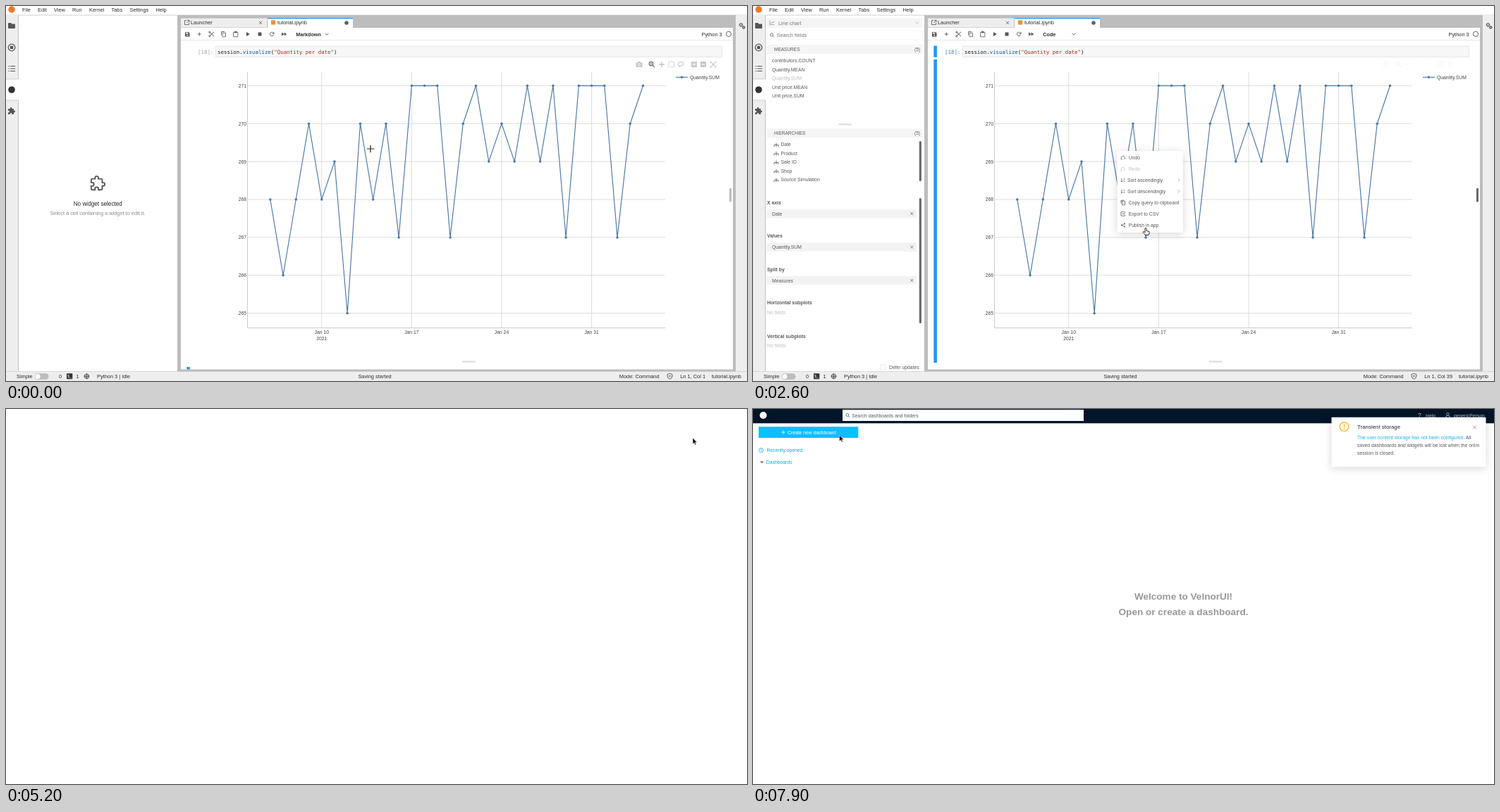
An HTML page for the animation above (8000 ms loop, 1051 by 533 pixels).

```html
<!DOCTYPE html>
<html lang="en">
<head>
<meta charset="utf-8">
<title>Publish a widget</title>
<style>
html, body { margin: 0; width: 100%; height: 100%; overflow: hidden; background: #fff; }
svg { display: block; width: 1051px; height: 533px; }
text { font: 6.8px "Liberation Sans", Arial, sans-serif; fill: #595959; white-space: pre; }
.ui { font-size: 7.4px; fill: #2b2b2b; }
.b { font-weight: bold; }
.cap { font-size: 6.5px; }
.title { font-size: 7.9px; fill: #262626; }
.code { font: 7.41px "DejaVu Sans Mono", monospace; fill: #212121; }
.url { font: 8.2px "Noto Sans", sans-serif; fill: #333; }
.hero { font: bold 13.57px "Liberation Sans", Arial, sans-serif; fill: #999; }
.mid { text-anchor: middle; }
.end { text-anchor: end; }
.off { fill: #bfbfbf; }
.link { fill: #1fb0ea; }
.card { filter: drop-shadow(0 2px 6px rgba(0,0,0,.16)); }
</style>
</head>
<body>
<svg id="stage" viewBox="0 0 1051 533" xmlns="http://www.w3.org/2000/svg"></svg>
<script>
const DARK = '#555', SKY = '#00aeef', LINE = '#4c78a8';

// ---- drawing helpers, all returning markup ----
const text = (x, y, s, cls = '', extra = '') =>
  `<text x="${x}" y="${y}" class="${cls}" ${extra}>${s}</text>`;
const rect = (x, y, w, h, fill, extra = '') =>
  `<rect x="${x}" y="${y}" width="${w}" height="${h}" fill="${fill}" ${extra}/>`;
const dot = (x, y, r, fill, extra = '') =>
  `<circle cx="${x}" cy="${y}" r="${r}" fill="${fill}" ${extra}/>`;
const ring = (x, y, r, color, w = 1) => dot(x, y, r, 'none', `stroke="${color}" stroke-width="${w}"`);
const line = (d, color = DARK, w = 1, extra = '') =>
  `<path d="${d}" fill="none" stroke="${color}" stroke-width="${w}" ${extra}/>`;
const shape = (d, fill = DARK, extra = '') => `<path d="${d}" fill="${fill}" ${extra}/>`;
const group = (id, body, extra = '') => `<g id="${id}" ${extra}>${body}</g>`;
const at = (x, y, body, scale = 1) => `<g transform="translate(${x} ${y}) scale(${scale})">${body}</g>`;
const cross = (x, y, r, color = DARK, w = .8) =>
  line(`M${x - r} ${y - r}l${2 * r} ${2 * r}m0 ${-2 * r}l${-2 * r} ${2 * r}`, color, w);
const plus = (x, y, r, color = DARK, w = .9) => line(`M${x - r} ${y}h${2 * r}M${x} ${y - r}v${2 * r}`, color, w);
const chevron = (x, y, color = DARK) => line(`M${x - 2.3} ${y - 1.2}l2.3 2.4 2.3-2.4`, color, .9);
const lens = (x, y, color) => ring(x - .6, y - .6, 2, color, .8) + line(`M${x + .9} ${y + .9}l2 2`, color, .8);

const PUZZLE = 'M20.5 11H19V7c0-1.1-.9-2-2-2h-4V3.5C13 2.1 11.9 1 10.5 1S8 2.1 8 3.5V5H4c-1.1 0-2 .9-2 2v3.8h1.5' +
  'c1.5 0 2.7 1.2 2.7 2.7S5 16.2 3.5 16.2H2V20c0 1.1.9 2 2 2h3.8v-1.5c0-1.5 1.2-2.7 2.7-2.7s2.7 1.2 2.7 2.7V22H17' +
  'c1.1 0 2-.9 2-2v-4h1.5c1.4 0 2.5-1.1 2.5-2.5S21.9 11 20.5 11z';
const gear = (x, y, r) => ring(x, y, r, DARK, 1.1) + dot(x, y, r + .7, 'none',
  `stroke="${DARK}" stroke-width="1" stroke-dasharray="${r * .6}"`);

// ---- notebook window ----
function chrome() {
  const menu = [['File', 23], ['Edit', 45], ['View', 68], ['Run', 94], ['Kernel', 118], ['Tabs', 149.5], ['Settings', 175.5], ['Help', 212.5]];
  const leftBar = rect(0, 13, 18, 507, '#eee') + rect(17, 13, 1, 507, '#c4c4c4') + rect(0, 104, 18, 30, '#fff') +
    rect(0, 103.5, 17, .8, '#c4c4c4') + rect(0, 133.5, 17, .8, '#c4c4c4') +
    shape('M3 25q0-1 1-1h3l1.3 1.4H12q1 0 1 1V31q0 1-1 1H4q-1 0-1-1z') +
    ring(8, 59, 4.8, DARK, 1.3) + rect(5.8, 56.8, 4.4, 4.4, DARK) +
    [85.5, 89, 92.5].map(y => line(`M3.5 ${y}h1.4m1.2 0h7`, DARK, 1.1)).join('') +
    dot(8, 119, 4.8, '#333') + at(2, 143.5, shape(PUZZLE), .48);
  const dock = rect(243, 13, 792, 507, '#bdbdbd') + rect(248, 17.5, 122, 13, '#eee') + rect(371, 17.5, 121, 14, '#fff') +
    rect(371, 17, 121, 1.2, '#2196f3') + rect(248, 31, 783, 485.5, '#fff') + rect(248, 48, 783, .7, '#ddd') +
    line('M256 20.5h-2.5v6h6V24M257 20.3h3v3m0-3l-3.5 3.6', DARK, .8) + text(262, 26, 'Launcher', 'ui') + cross(361, 23.8, 2.1) +
    rect(376, 20.3, 6.2, 6.2, '#f39034') + text(385, 26, 'tutorial.ipynb', 'ui') + dot(483, 24, 2.8, '#616161');
  const tools = shape('M254 37h5l1.5 1.5V43.500h-6.500zM255 37.800v1.600h3.300v-1.600z', DARK, 'fill-rule="evenodd"') + dot(257.2, 41.6, 1, '#fff') +
    plus(274.3, 40, 2.6) + line('M288.500 37l6.500 6.200M288.500 43l6.500-6.200', DARK, 1) + ring(288.8, 37.2, 1.1, DARK, .8) + ring(288.8, 42.8, 1.1, DARK, .8) +
    line('M305.500 41.500v-5h4.500M307 38.200h4.500v5.500H307z', DARK, .8) + line('M322.500 37.300h6.300v6.500h-6.300z', DARK, .8) + rect(324, 36, 3.4, 2.2, DARK) +
    shape('M341 37l4.800 3-4.800 3zM357.500 37.500h5v5h-5zM391 37.400l3.600 2.600-3.600 2.600zM394.600 37.400l3.600 2.600-3.600 2.600z') +
    line('M379.400 38.500a2.700 2.700 0 1 0 .3 2.300', DARK, .9) + shape('M380.400 36.800v2.900h-2.900z') +
    text(411.3, 42.5, '', 'ui b', 'id="mode" style="font-size:7.2px"') + chevron(455, 40) +
    text(986.5, 42.5, 'Python 3', 'ui') + ring(1025, 39.8, 3.6, DARK, .9);
  const status = rect(0, 519.5, 1051, 13.5, '#eee') + rect(0, 519, 1051, .6, '#c8c8c8') + text(15, 528.8, 'Simple', 'ui') +
    rect(40.5, 522.3, 20, 8.6, '#bdbdbd', 'rx="4.300"') + dot(45, 526.6, 3.6, '#fff') +
    text(75, 528.8, '0', 'ui') + rect(86, 522.3, 8.3, 8, '#333', 'rx="1"') + text(87.2, 528.3, '$_', '', 'style="font-size:5px;fill:#fff"') +
    text(99.5, 528.8, '1', 'ui') + ring(114.5, 526.2, 3, DARK, 1.1) + plus(114.5, 526.2, 4.3, DARK, .8) + dot(114.5, 526.2, 1.2, DARK) +
    text(129, 528.8, 'Python 3 | Idle', 'ui') + text(0, 528.8, 'Saving started', 'ui mid', 'id="saving"') +
    group('modeInfo', text(926.5, 528.8, 'Mode: Command', 'ui end') +
      line('M938 523.500l3.500-1.200 3.500 1.200v2.500q0 3-3.500 4.300-3.500-1.300-3.500-4.300z', DARK, .9) + cross(941.5, 526, 1.4)) +
    text(992, 528.8, '', 'ui end', 'id="position"') + text(1001, 528.8, 'tutorial.ipynb', 'ui');
  return rect(0, 0, 1051, 533, '#fff') + rect(0, 12.7, 1051, .7, '#bdbdbd') + dot(8, 5, 4.7, '#f37726') +
    menu.map(([s, x]) => text(x, 7.7, s, 'ui')).join('') + leftBar + dock + tools +
    rect(1035, 13, 16, 507, '#eee') + gear(1042.5, 26.8, 1.8) + gear(1046.3, 30.4, 1.3) + status;
}

function chart() {
  const day = n => 374.8 + 18.232 * n, level = v => 113.3 + (271 - v) * 53.9;
  const values = [...'838...'].length && [...'868089508071117019091917111701'];
  const decode = { 8: 268, 6: 266, 0: 270, 9: 269, 5: 265, 7: 267, 1: 271 };
  const series = [268, 266, 268, 270, 268, 269, 265, 270, 268, 270, 267, 271, 271, 271, 267,
    270, 271, 269, 270, 269, 271, 269, 271, 267, 271, 271, 271, 267, 270, 271];
  const points = series.map((v, i) => [day(i), level(v)]);
  const GRID = '#d3d3d3';
  let out = '';
  for (let v = 265; v <= 271; v++)
    out += line(`M342.500 ${level(v)}H935`, GRID, .8) + text(341, level(v) + 2.4, v, 'end', 'style="fill:#444"');
  ['Jan 10', 'Jan 17', 'Jan 24', 'Jan 31'].forEach((s, i) => {
    const x = day(4 + 7 * i);
    out += line(`M${x} 93.500V457.500`, GRID, .8) + text(x, 466, s, 'mid', 'style="fill:#444"');
  });
  return out + text(day(4), 474.6, '2021', 'mid', 'style="fill:#444"') + line('M342.500 93.500V457.500H935', '#c4c4c4', .9) +
    line('M' + points.map(p => p.join(' ')).join('L'), LINE, 1.15) + points.map(([x, y]) => dot(x, y, 1.75, LINE)).join('') +
    line('M950 101.300h17', LINE, 1.15) + dot(958.5, 101.3, 1.75, LINE) + text(970, 103.8, 'Quantity.SUM', '', 'style="fill:#444"');
}

function plotTools() {
  const c = '#c6c6c6';
  return shape('M893.500 80.500h2l1-1.500h3l1 1.500h2v6.300h-9z', c) + ring(898, 83.4, 1.6, '#fff', .9) +
    ring(915, 82, 2.7, '#7c7c7c', 1.5) + line('M917 84l3 3', '#7c7c7c', 1.5) + plus(915, 82, 1.3, '#7c7c7c', .8) +
    plus(930, 83, 4, c, 1.3) + dot(930, 83, 1.5, c) + line('M940 79.200h7.800v7.600H940z', c, 1.1, 'stroke-dasharray="1.800 1"') +
    line('M955 85.500c-3-2-1.500-6 2.500-6s5 4 1.500 5.300-4-.5-4.500 2.200', c, 1.1) +
    [976, 989].map(x => rect(x - 4, 79, 8, 8, c)).join('') + plus(976, 83, 2.3, '#fff', 1.2) + line('M986.700 83h4.600', '#fff', 1.2) +
    cross(1003, 83, 2.6, c, 1.2) + line('M999 81v-2h2m4 0h2v2m0 4v2h-2m-4 0h-2v-2', c, 1);
}

function notebook() {
  const code = text(300, 67.5, 'session.<tspan fill="#0055aa">visualize</tspan>(<tspan fill="#ba2121">"Quantity per date"</tspan>)', 'code');
  return rect(297.5, 57, 718, 15.6, '#f7f7f7', 'stroke="#e0e0e0" stroke-width=".700"') + text(272, 67.5, '[18]:', 'code', 'id="prompt"') + code +
    chart() + group('plotTools', plotTools()) + rect(647, 504.3, 18.5, 2.4, '#e0e0e0') +
    rect(1026, 259, 3, 19.5, '#bbb', 'id="thumb" rx="1"');
}

const emptyPanel = () => at(119, 241, line(PUZZLE, DARK, 2), .92) +
  text(130.3, 284, 'No widget selected', 'mid', 'style="font-size:8.2px;fill:#262626"') +
  text(130, 297, 'Select a cell containing a widget to edit it.', 'mid', 'style="font-size:7.4px;fill:#8a8a8a"');

function editorPanel() {
  const band = (y, s) => rect(20, y, 220, 13, '#f5f5f5') + text(30, y + 9, s, 'cap') + text(237, y + 8.8, '(5)', 'cap end');
  const measures = ['contributors.COUNT', 'Quantity.MEAN', 'Quantity.SUM', 'Unit price.MEAN', 'Unit price.SUM'];
  const trees = ['Date', 'Product', 'Sale ID', 'Shop', 'Source Simulation'];
  const fields = [['X axis', 'Date'], ['Values', 'Quantity.SUM'], ['Split by', 'Measures'], ['Horizontal subplots'], ['Vertical subplots']];
  return rect(20, 17, 220, 14, '#f5f5f5') + line('M24 20.500v6h6M25.500 25l1.500-2 1.200 1 1.800-2.500', '#888', .7) +
    text(36, 26.6, 'Line chart', '', 'style="font-size:7.4px;fill:#777"') + chevron(233, 24, '#bbb') +
    rect(20, 35, 220, 13, '#fff', 'stroke="#efefef" stroke-width=".600"') + lens(27, 41.5, DARK) +
    text(33.5, 44.2, 'Search fields', '', 'style="font-size:7.4px;fill:#777"') +
    band(55, 'MEASURES') + measures.map((s, i) => text(27, 80 + 12.5 * i, s, i === 2 ? 'off' : '')).join('') +
    rect(121, 167, 18.5, 2.4, '#e0e0e0') + band(174.3, 'HIERARCHIES') +
    trees.map((s, i) => line(`M30 ${200 + 12.5 * i}v-2.500h6v2.500m-3 0v-5.500`, DARK, .8) + text(39.5, 199.4 + 12.5 * i, s)).join('') +
    rect(235.7, 192, 3.2, 57, '#6a6a6a', 'rx="1.500"') + rect(235.7, 273, 3.2, 178, '#6a6a6a', 'rx="1.500"') +
    fields.map(([label, value], i) => {
      const y = 47.4 * i;
      return text(20, 282 + y, label, 'b', 'style="font-size:6.85px"') + (value
        ? rect(20, 289 + y, 212, 12.3, '#f3f3f3', 'rx="1"') + text(27, 297.7 + y, value) + cross(225.3, 295.2 + y, 2, DARK, .7)
        : text(20, 295.3 + y - (i === 4 ? .3 : 0), 'No fields', 'off'));
    }).join('') +
    rect(181, 510, 7, 7, '#fff', 'stroke="#e0e0e0" stroke-width=".700"') + text(193, 516, 'Defer updates') +
    rect(256.3, 56.5, 4.6, 16.3, '#2196f3') + rect(256.3, 76, 4.6, 431, '#2196f3');
}

function contextMenu() {
  const undo = y => line(`M523 ${y + 2.5}a2.700 2.700 0 1 1 3.600 0M522 ${y + 2.6}h1.600`, 'currentColor', .8);
  const sort = y => line(`M523 ${y - 2.5}v5m-1-1.200l1 1.200 1-1.200M526.300 ${y - 2.5}v2m0 1v2`, 'currentColor', .8);
  const items = [
    ['Undo', undo], ['Redo', undo], ['Sort ascendingly', sort], ['Sort descendingly', sort],
    ['Copy query to clipboard', y => line(`M523.500 ${y - 2.2}h4v5.500h-4zM522 ${y + 1}v-4.300h4`, 'currentColor', .8)],
    ['Export to CSV', y => line(`M527.500 ${y - 1.5}v-1.300h-5.500v5.600h5.500v-1.300M524 ${y}h4`, 'currentColor', .8)],
    ['Publish in app', y => dot(522.8, y, 1, 'currentColor') + dot(527, y - 2, 1, 'currentColor') + dot(527, y + 2, 1, 'currentColor') +
      line(`M527 ${y - 2}l-4 2 4 2`, 'currentColor', .7)]];
  return rect(516.5, 206, 93.3, 116, '#fff', 'rx="1" class="card"') + items.map(([s, icon], i) => {
    const y = 215.5 + 16 * i, sorting = icon === sort;
    return `<g class="item" color="${i === 1 ? '#bfbfbf' : '#595959'}">${icon(y)}` +
      text(sorting ? 531 : 532.7, y + 2.5, s, '', 'style="fill:currentColor"') +
      (sorting ? line(`M602.700 ${y - 2.4}l2.400 2.400-2.400 2.400`, '#888', .7) : '') + '</g>';
  }).join('');
}

const toast = (height, icon, title, rows) => rect(820.5, 11.7, 219, height, '#fff', 'rx="1" class="card"') + icon +
  text(857, 28.3, title, 'title') + cross(1023.5, 26, 2.3, '#888', .8) + rows.map((s, i) => text(857, 42.5 + 11.4 * i, s)).join('');

// ---- dashboard page ----
const header = () => rect(0, 0, 1051, 20.3, '#001529') + dot(14.5, 9, 5, '#fff') + rect(127, 1, 342, 16, '#fff') + lens(134.5, 9, DARK) +
  text(140.3, 11.6, 'Search dashboards and folders') + text(943, 12, '?', '', 'style="font-size:8.5px;fill:#b3b9bf"') +
  text(954, 11.5, 'Help', '', 'style="fill:#b3b9bf"') + ring(985.5, 7.3, 1.8, '#b3b9bf', .8) + line('M982.500 12.300q0-3 3-3t3 3', '#b3b9bf', .8) +
  text(994, 11.5, 'genericPerson', '', 'style="fill:#b3b9bf"');
const home = () => rect(8, 25.2, 141.3, 15.8, SKY, 'id="create"') + plus(43, 33, 2.7, '#fff', .8) +
  text(49, 35.6, 'Create new dashboard', '', 'style="fill:#fff"') + ring(11.5, 58.6, 3, SKY, .8) + line('M11.500 56.600v2.200l1.400.8', SKY, .7) +
  text(19.4, 61.1, 'Recently opened', '', `style="fill:${SKY}"`) + shape('M10 74.500h5.200l-2.600 2.800z', '#666') +
  text(18.8, 78.3, 'Dashboards', '', `style="fill:${SKY}"`) +
  text(610.5, 270.5, 'Welcome to VelnorUI!', 'hero mid') + text(610.5, 293.3, 'Open or create a dashboard.', 'hero mid');
const spinner = () => [[0, -4], [4, 0], [0, 4], [-4, 0]].map(([x, y], i) =>
  dot(525.5 + x, 276.5 + y, 2, SKY, `opacity="${.4 + .2 * i}"`)).join('');

// ---- pointers ----
const pointers = {
  cross: plus(0, 0, 5.8, '#fff', 2.6) + plus(0, 0, 5.2, '#222', 1.2),
  arrow: shape('M0 0V8.800L2 7 3.400 10 4.900 9.400 3.500 6.500H6.200Z', '#111', 'stroke="#fff" stroke-width=".500"'),
  hand: shape('M-1 .8C-1-.4 1-.4 1 .8V4L5 5V8L4 10H-.5L-4 6C-4 5-3 4.600-2.200 5.400L-1 6.400Z', '#fff', 'stroke="#111" stroke-width=".900"'),
  denied: dot(0, 0, 4.6, '#fff', 'stroke="#222" stroke-width="1.300"') + line('M-3.200-3.200l6.400 6.400', '#222', 1.3)
};

const stage = document.getElementById('stage');
stage.innerHTML =
  group('lab', chrome() + notebook() + group('empty', emptyPanel() + rect(256.3, 513, 4.6, 3.5, '#2196f3')) +
    group('editor', editorPanel()) + group('menu', contextMenu()) +
    group('published', toast(40.5, ring(838.5, 25, 6.3, '#52c41a', 1.2) + line('M835.500 25l2.200 2.300 3.800-4.600', '#52c41a', 1.2),
      'Widget published', ['Find it in the "Widgets" drawer of <tspan class="link">the app</tspan>.']))) +
  group('page', rect(0, 0, 1051, 533, '#fff') + group('header', header()) + group('spinner', spinner()) + group('home', home()) +
    group('transient', toast(70.5, ring(838.5, 25, 6.3, '#faad14', 1.2) + line('M838.500 21.500v4.500m0 1.300v1.400', '#faad14', 1.3),
      'Transient storage', ['<tspan class="link">The user content storage has not been configured.</tspan> All',
        'saved dashboards and widgets will be lost when the orlim', 'session is closed.']))) +
  group('bubble', rect(-1, 521.3, 63, 13, '#f4f4f4', 'id="bubbleBox" stroke="#ccc" stroke-width=".700"') + text(1, 530.5, '', 'url', 'id="bubbleText"')) +
  Object.entries(pointers).map(([k, body]) => group('ptr-' + k, body)).join('');

// ---- timeline: each row is [start ms, value, ...] ----
const tracks = {
  pointer: [[0, 'cross', 517, 203], [2300, 'hand', 524, 224], [2400, 'hand', 541, 268], [2500, 'hand', 554, 304], [2600, 'hand', 557, 315.5],
    [3300, 'denied', 557, 317], [3500, 'denied', 554, 309], [4000, 'cross', 825, 163], [4200, 'cross', 905, 103], [4400, 'arrow', 952, 61],
    [4600, 'arrow', 966, 50], [4800, 'arrow', 975, 40], [5000, 'hand', 976, 40], [5200, 'arrow', 974, 41], [6500, 'arrow', 798.5, 112.5],
    [6700, 'arrow', 331.5, 96], [6900, 'arrow', 186, 62], [7000, 'arrow', 138, 50.5], [7200, 'arrow', 126, 42.5], [7700, 'arrow', 122.5, 37]],
  menu: [[0, 0, .8], [1700, .12, .845], [1800, .75, .97], [1900, 1, 1]],
  plotTools: [[0, 1], [2300, .8], [2400, .5], [2500, .2], [2600, .06], [3300, 0], [4000, .1], [4200, 1], [4600, .3], [4800, 0]],
  published: [[0, 0, 171], [3300, .1, 171], [3500, 1, 0]],
  transient: [[0, 0, 171], [6500, .1, 171], [6700, 1, 0]],
  bubble: [[0, ''], [5000, 'localhost:42261', 63], [5200, ''], [5500, 'Transferring data from localhost:42261…', 184], [5900, '']],
  create: [[0, SKY], [7700, '#06b6f6'], [7900, '#0cbfff']]
};
const now = (name, t) => tracks[name].findLast(row => row[0] <= t).slice(1);
const el = id => document.getElementById(id);
const show = (id, on) => { el(id).style.display = on ? '' : 'none'; };
const attrs = (id, map) => { for (const k in map) el(id).setAttribute(k, map[k]); };

function render(t) {
  const editing = t >= 700;
  show('lab', t < 5200);
  show('page', t >= 5200);
  show('empty', !editing);
  show('editor', editing);
  el('mode').textContent = editing ? 'Code' : 'Markdown';
  el('position').textContent = editing ? 'Ln 1, Col 39' : 'Ln 1, Col 1';
  attrs('saving', { x: editing ? 521 : 523 });
  attrs('modeInfo', { transform: `translate(${editing ? -4 : 0} 0)` });
  el('prompt').style.fill = editing ? '#307fc1' : '#a3a3a3';
  attrs('thumb', { fill: editing ? '#666' : '#bbb' });

  const [menuAlpha, scale] = now('menu', t);
  attrs('menu', { opacity: menuAlpha, transform: `translate(0 ${206 * (1 - scale)}) scale(1 ${scale})` });
  [...document.querySelectorAll('.item')].pop().setAttribute('color', t >= 3300 ? '#bfbfbf' : '#595959');
  attrs('plotTools', { opacity: now('plotTools', t)[0] });
  for (const id of ['published', 'transient']) {
    const [alpha, dx] = now(id, t);
    attrs(id, { opacity: alpha, transform: `translate(${dx} 0)` });
  }

  show('header', t >= 6200);
  show('spinner', t >= 6200 && t < 6500);
  show('home', t >= 6500);
  attrs('create', { fill: now('create', t)[0] });

  const [message, width = 0] = now('bubble', t);
  show('bubble', message);
  el('bubbleText').textContent = message;
  attrs('bubbleBox', { width });

  const [kind, x, y] = now('pointer', t);
  for (const k in pointers) show('ptr-' + k, k === kind);
  attrs('ptr-' + kind, { transform: `translate(${x} ${y})` });
}

const start = performance.now();
function tick() {
  render((performance.now() - start) % 8000);
  requestAnimationFrame(tick);
}
render(0);
requestAnimationFrame(tick);
</script>
</body>
</html>
```
